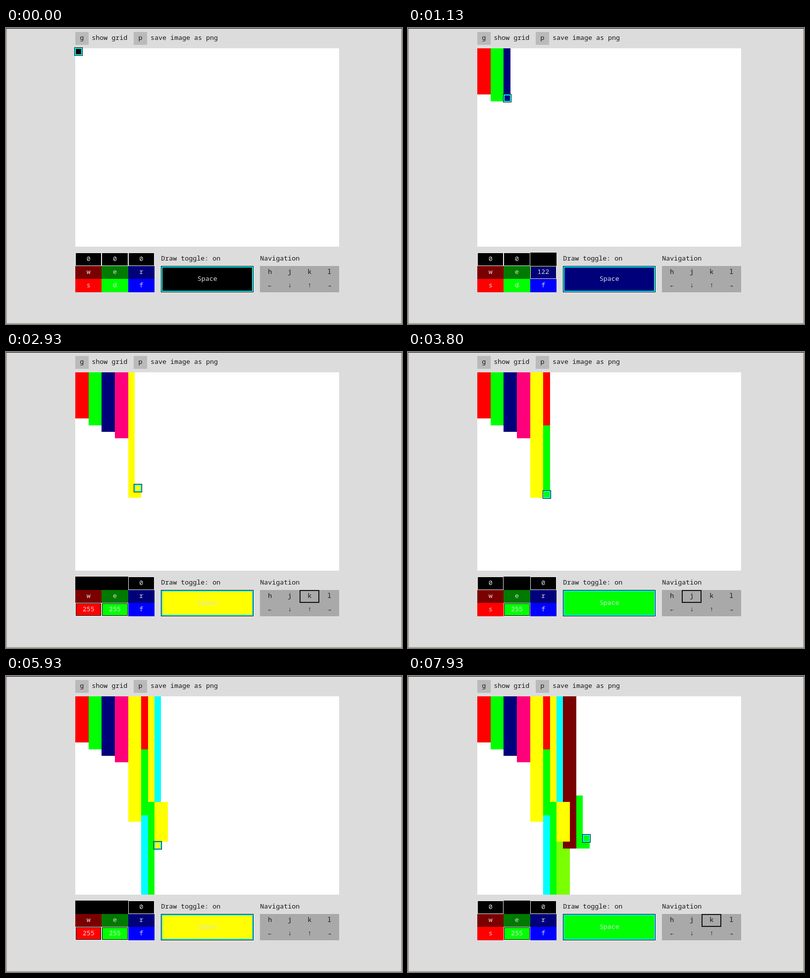
Recreate the animation shown at these times as an HTML page with a canvas. Size 800 by 597 pixels, loop 8000 ms.

```html
<!DOCTYPE html>
<html lang="en">
<head>
<meta charset="utf-8">
<title>Keyboard pixel editor</title>
<style>
  html, body { margin: 0; width: 100%; height: 100%; overflow: hidden; background: #dddcdd; }
  canvas { display: block; width: 800px; height: 597px; }
</style>
</head>
<body>
<canvas id="stage" width="800" height="597"></canvas>
<script>
const ctx = document.getElementById('stage').getContext('2d');
const LOOP = 8000;
const CELL = 40 / 3, LEFT = 140, TOP = 41;
const LEVELS = [0, 122, 255];
const PALE = '#dddddd', INK = '#161616', CYAN = '#00ffff';
const MOVES = { h: [-1, 0], j: [0, 1], k: [0, -1], l: [1, 0] };

// Key presses up to each tick: moves with a count, three colour levels, or "-" to release.
const SCRIPT = [
  [17, '200 j6 l1 k6 l1 020 j7 l1 k7 l1 001 j7 -'],
  [44, 'j1 l1 k8 l1 201 j9 l1 k9 l1 220 j18 l1 k1'],
  [72, 'k17 l1 200 j8 020 j10 022 j11 l1 020 k14 220 k15'],
  [89, 'l1 022 j16 220 j5 l1 k5 h1 j6 -'],
  [102, '120 j7 l1 k7 100 l1 k1'],
  [119, 'k21 h1 j15 l2 020 j7 l1 k1']
];

function parse(text) {
  const list = [];
  for (const word of text.split(' ')) {
    if (word === '-') list.push({ release: true, weight: 1 });
    else if (MOVES[word[0]]) {
      for (let i = 0; i < +word.slice(1); i++) list.push({ key: word[0], weight: 1 });
    } else {
      list.push({ release: true, weight: 1 }, { levels: [...word].map(Number), weight: 2 });
    }
  }
  return list;
}

const events = [];
let begin = 0;
for (const [end, text] of SCRIPT) {
  const list = parse(text);
  const total = list.reduce((sum, e) => sum + e.weight, 0);
  let done = 0;
  for (const e of list) {
    done += e.weight;
    events.push({ ...e, at: begin + (end - begin) * done / total });
  }
  begin = end;
}

function stateAt(tick) {
  const s = { x: 0, y: 0, levels: [0, 0, 0], key: '', cells: new Map() };
  const paint = () => s.cells.set(s.x + s.y * 40, rgb(s.levels));
  paint();
  for (const e of events) {
    if (e.at > tick + 1e-6) break;
    s.key = e.key || '';
    if (e.levels) s.levels = e.levels;
    if (e.key) {
      s.x += MOVES[e.key][0];
      s.y += MOVES[e.key][1];
    }
    paint();
  }
  return s;
}

function rgb(levels) {
  return `rgb(${levels.map(i => LEVELS[i]).join(',')})`;
}

function box(x0, y0, x1, y1, color) {
  ctx.fillStyle = color;
  ctx.fillRect(x0, y0, x1 - x0, y1 - y0);
}

function frame(x0, y0, x1, y1, width, color) {
  ctx.strokeStyle = color;
  ctx.lineWidth = width;
  ctx.strokeRect(x0 + width / 2, y0 + width / 2, x1 - x0 - width, y1 - y0 - width);
}

function label(text, x, y, color = INK, align = 'left') {
  ctx.fillStyle = color;
  ctx.textAlign = align;
  ctx.fillText(text, x, y);
}

function focusRing(x0, y0, x1, y1) {
  frame(x0, y0, x1, y1, 1, '#000');
  frame(x0 + 1, y0 + 1, x1 - 1, y1 - 1, 2, CYAN);
}

function drawWindow() {
  box(0, 0, 800, 597, '#dddcdd');
  frame(0, 0, 800, 597, 1.5, '#9c9082');
  box(0, 0, 800, 1, '#111');
  box(140, 8, 167, 34, '#bbbabb');
  box(258, 8, 285, 34, '#bbbabb');
  label('g', 153.3, 24, INK, 'center');
  label('show grid', 173.3, 24);
  label('p', 271.6, 24, INK, 'center');
  label('save image as png', 292, 24);
}

function drawPicture(s) {
  box(140, 41, 673, 441, '#fff');
  const px = c => Math.round(LEFT + c * CELL), py = r => Math.round(TOP + r * CELL);
  for (const [i, color] of s.cells) {
    const c = i % 40, r = Math.floor(i / 40);
    box(px(c), py(r), px(c + 1), py(r + 1), color);
  }
  const x = Math.ceil(LEFT + s.x * CELL - 2), y = Math.ceil(TOP + s.y * CELL - 2);
  box(x, y, x + 17, y + 17, rgb(s.levels));
  focusRing(x, y, x + 17, y + 17);
}

function drawLevels(levels) {
  const xs = [140, 193, 247, 300], ys = [453, 480, 506, 533];
  const keys = ['', 'wer', 'sdf'];
  for (let c = 0; c < 3; c++) {
    for (let row = 0; row < 3; row++) {
      const tone = [0, 0, 0], active = levels[c] === row;
      tone[c] = row;
      const area = [xs[c], ys[row], xs[c + 1], ys[row + 1]];
      box(...area, rgb(tone));
      if (active) {
        frame(...area, 1, '#eee');
        frame(area[0] + 1, area[1] + 1, area[2] - 1, area[3] - 1, 1, '#000');
      }
      const text = active ? LEVELS[row] : keys[row][c] || '';
      label(text, 166.7 + c * 53.33, [469.5, 496, 522.5][row], PALE, 'center');
    }
  }
}

function drawControls(s) {
  label('Draw toggle: on', 313.3, 469);
  box(313, 480, 500, 533, rgb(s.levels));
  focusRing(313, 480, 500, 533);
  label('Space', 406.7, 509.5, PALE, 'center');

  label('Navigation', 513.3, 469);
  box(513, 480, 673, 533, '#aaa9aa');
  [...'hjkl'].forEach((key, i) => {
    const x = 513.3 + i * 40;
    label(key, x + 20, 496, INK, 'center');
    label('←↓↑→'[i], x + 20, 522.5, INK, 'center');
    if (s.key === key) frame(Math.round(x), 480, Math.round(x) + 40, 506, 2, '#111');
  });
}

function render(now) {
  const t = now % LOOP, part = t % 200;
  const tick = 3 * Math.floor(t / 200) + (part >= 70) + (part >= 130);
  const s = stateAt(tick);
  ctx.font = '13.33px "Noto Sans Mono", "Liberation Mono", monospace';
  drawWindow();
  drawPicture(s);
  drawLevels(s.levels);
  drawControls(s);
}

const start = performance.now();
function loop() {
  render(performance.now() - start);
  requestAnimationFrame(loop);
}
loop();
</script>
</body>
</html>
```
